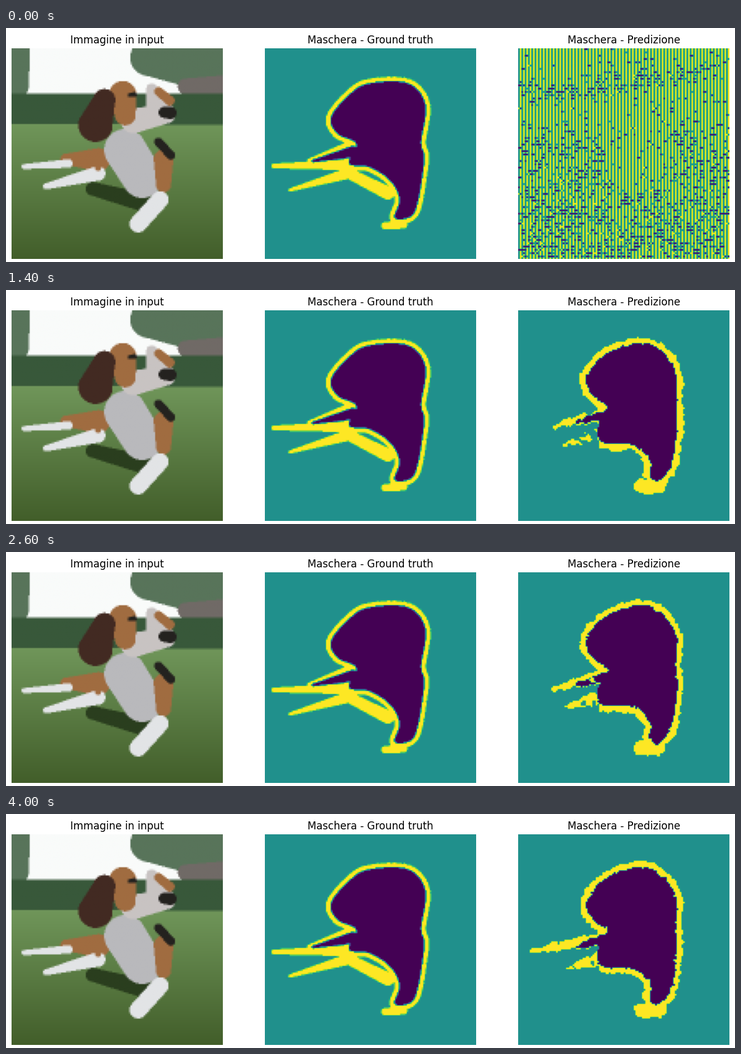
Recreate the animation shown at these times as a matplotlib script. Size 1180x380 px, loop 4200 ms.

```python
import numpy as np
import matplotlib.pyplot as plt
from matplotlib.animation import FuncAnimation
from matplotlib.colors import to_rgb
from matplotlib.path import Path

W, H, N = 1180, 380, 128
FRAMES, STEP = 21, 200
# three panels, separated by a fifth of their width
LEFT, TOP, SIDE = 8.75, 33.1, 341.91
PITCH = 1.2 * SIDE
DOG, GROUND, EDGE = 0, 1, 2


def grid(n=N):
    """Cell centres of a panel, in pixels from its top left corner."""
    c = (np.arange(n) + 0.5) * SIDE / n
    return np.meshgrid(c, c)


def stroke(X, Y, x0, y0, r0, x1, y1, r1):
    """Signed distance to a tapered stroke with round ends."""
    dx, dy = x1 - x0, y1 - y0
    t = np.clip(((X - x0) * dx + (Y - y0) * dy) / (dx * dx + dy * dy), 0, 1)
    return np.hypot(X - x0 - t * dx, Y - y0 - t * dy) - r0 - t * (r1 - r0)


def spline(keys, steps=8):
    """Closed Catmull-Rom curve through the key points."""
    p1 = np.array(keys, float)
    p0, p2, p3 = (np.roll(p1, s, 0) for s in (1, -1, -2))
    t = np.arange(steps)[None, :, None] / steps
    p0, p1, p2, p3 = (p[:, None] for p in (p0, p1, p2, p3))
    curve = (2 * p1 + (p2 - p0) * t + (2 * p0 - 5 * p1 + 4 * p2 - p3) * t**2
             + (3 * p1 - p0 - 3 * p2 + p3) * t**3) / 2
    return curve.reshape(-1, 2)


def outline(X, Y, keys):
    """Signed distance to a closed curve, negative inside."""
    curve = spline(keys)
    d = np.full(X.shape, np.inf)
    for x, y in curve:
        d = np.minimum(d, np.hypot(X - x, Y - y))
    xy = np.column_stack([X.ravel(), Y.ravel()])
    return np.where(Path(curve).contains_points(xy).reshape(X.shape), -d, d)


def shrink(a, ss):
    n = len(a) // ss
    return a.reshape(n, ss, n, ss, -1).mean((1, 3)).squeeze()


def noise(rng, soft):
    """Smooth random field with unit spread."""
    a = rng.normal(size=(N, N))
    for _ in range(soft):
        for ax in (0, 1):
            a = (np.roll(a, 1, ax) + 2 * a + np.roll(a, -1, ax)) / 4
    return a / a.std()


# ---- input picture -------------------------------------------------------

SKY, LAWN_FAR, LAWN_NEAR = "#f9fbfa", "#70965a", "#425e2a"
TREE, HEDGE, WALL, SHADE = "#58745a", "#38583a", "#706a66", "#2a3e1e"
FUR, TAN, BROWN, DARK = "#e2e4e6", "#a06c40", "#422a22", "#24221f"
CHEST, MUZZLE = "#b9b9bc", "#c8c3c2"

SCENE = [
    (TREE, 2, 0, 28, 4, 60, 24),
    (TREE, 222, 15, 30, 340, 25, 52),
    (WALL, 282, 62, 13, 340, 60, 16),
    (HEDGE, 0, 98, 25, 342, 99, 25),
    (SHADE, 131, 228, 11, 213, 250, 15),
    (TAN, 88, 180, 9, 140, 181, 19),
    (FUR, 20, 192, 4, 92, 187, 7),
    (FUR, 56, 224, 5, 140, 203, 12),
    (CHEST, 184, 165, 34, 212, 210, 33),
    (TAN, 144, 170, 6, 140, 194, 5),
    (TAN, 246, 180, 16, 246, 222, 12),
    (DARK, 238, 152, 7, 258, 174, 7),
    (FUR, 240, 246, 14, 205, 285, 14),
    (MUZZLE, 197, 118, 20, 250, 106, 16),
    (MUZZLE, 227, 66, 9, 234, 98, 17),
    (TAN, 180, 75, 22, 184, 108, 17),
    (TAN, 238, 70, 7, 256, 85, 8),
    (BROWN, 150, 84, 18, 136, 124, 28),
    (DARK, 247, 104, 9, 257, 105, 10),
    (DARK, 191, 76, 3, 199, 75, 4),
]


def picture(ss=2):
    X, Y = grid(N * ss)
    t = np.clip((Y - 122) / (SIDE - 122), 0, 1)[..., None]
    lawn = (1 - t) * to_rgb(LAWN_FAR) + t * np.array(to_rgb(LAWN_NEAR))
    img = np.where(t > 0, lawn, to_rgb(SKY))
    for color, *shape in SCENE:
        img[stroke(X, Y, *shape) < 0] = to_rgb(color)
    return shrink(img, ss)


# ---- masks ---------------------------------------------------------------

TRUE_BODY = [(169, 57), (232, 57), (260, 92), (253, 152), (258, 180),
             (248, 248), (236, 273), (210, 275), (218, 245), (202, 214),
             (169, 193), (136, 187), (148, 155), (118, 139), (107, 112),
             (137, 75)]
FOUND_BODY = [(191, 54), (230, 64), (256, 104), (255, 150), (257, 190),
              (248, 250), (226, 278), (213, 268), (214, 245), (188, 219),
              (133, 213), (133, 172), (146, 158), (120, 138), (111, 110),
              (138, 74)]


def truth(ss=2):
    X, Y = grid(N * ss)
    body = outline(X, Y, TRUE_BODY)
    edge = body < 8
    for part in ((14, 191, 4, 134, 189, 9), (41, 230, 3, 131, 204, 9),
                 (71, 182, 3, 136, 157, 6), (136, 203, 9, 199, 235, 11),
                 (194, 288, 6, 224, 286, 7)):
        edge |= stroke(X, Y, *part) < 0
    dog = (body < 0) | (stroke(X, Y, 78, 183, 2, 142, 168, 9) < 0)
    return shrink(np.where(dog, DOG, np.where(edge, EDGE, GROUND)), ss)


def untrained():
    """Stripes, broken up where the picture has texture."""
    rng = np.random.default_rng(3)
    X, Y = grid()
    row, col = np.indices((N, N))
    stripes = np.where(col % 2, EDGE, GROUND)
    ridge = 78 - 0.14 * X
    p = 0.06 + 0.4 * np.exp(-((Y - ridge) / 14) ** 2)
    p += np.where(Y > 118, 0.12 + 0.5 * (Y - 118) / SIDE, 0)
    p[stroke(X, Y, 180, 130, 45, 190, 190, 45) < 0] *= 0.35
    hit = (row % 2 == 0) & (rng.random((N, N // 2)).repeat(2, 1) < p)
    return np.where(hit, rng.choice([DOG, GROUND, EDGE], (N, N),
                                    p=[.55, .35, .1]), stripes)


CELLS = grid()
BODY = outline(*CELLS, FOUND_BODY)


def prediction(k):
    """Mask after k steps: ragged at first, then cleaner with longer legs."""
    if k == 0:
        return untrained()
    X, Y = CELLS
    rng = np.random.default_rng(100 + k)
    early = np.exp(-(k - 1) / 1.3)
    learnt = min(1, k / 14)
    ragged = (1.3 + 5 * early) * (noise(rng, 4) + noise(rng, 1)) / 1.5
    patchy = noise(rng, 2)

    edge = BODY + ragged < 10
    edge |= stroke(X, Y, 200, 285, 12, 226, 285, 13) + ragged < 0
    edge &= (X > 131) | (Y < 165)

    # legs fill in with training and stretch out at the end
    tip = 56 + rng.uniform(-8, 8) - 45 * max(0, (k - 17) / 3)
    upper = stroke(X, Y, tip, 189, 4, 126, 172, 11)
    lower = stroke(X, Y, 76, 219, 2, 130, 203, 12)
    edge |= (upper + ragged < 0) & (patchy < 2.6 * learnt - 0.3)
    edge |= (lower + ragged < 0) & (patchy < 1.8 * learnt - 0.9)
    paw = stroke(X, Y, 96, 182, 3, 136, 172, 8) + ragged < 0

    mask = np.where(edge, EDGE, GROUND)
    mask[(BODY + ragged < 0) | (paw & (patchy < 2 * learnt - 0.8))] = DOG

    # small mistakes inside the body
    slips = noise(rng, 4) > 2.9 + 0.6 * learnt - early
    mask[(BODY < -5) & slips] = EDGE
    stray = noise(rng, 1) > 3.6 - 1.2 * early
    mask[(BODY < 50) & (BODY > 0) & stray] = EDGE
    return mask


# ---- figure --------------------------------------------------------------

fig = plt.figure(figsize=(W / 100, H / 100), dpi=100, facecolor="white")
masks = [prediction(k) for k in range(FRAMES)]
titles = ("Immagine in input", "Maschera - Ground truth",
          "Maschera - Predizione")
panels = []
for i, data in enumerate((picture(), truth(), masks[0])):
    ax = fig.add_axes([(LEFT + i * PITCH) / W, 1 - (TOP + SIDE) / H,
                       SIDE / W, SIDE / H])
    panels.append(ax.imshow(data, cmap="viridis", vmin=0, vmax=2))
    ax.set_title(titles[i], fontsize=12, fontfamily="DejaVu Sans")
    ax.axis("off")


def update(k):
    panels[2].set_data(masks[k])
    return [panels[2]]


anim = FuncAnimation(fig, update, frames=FRAMES, interval=STEP,
                     repeat=True, repeat_delay=0)
plt.show()
```
